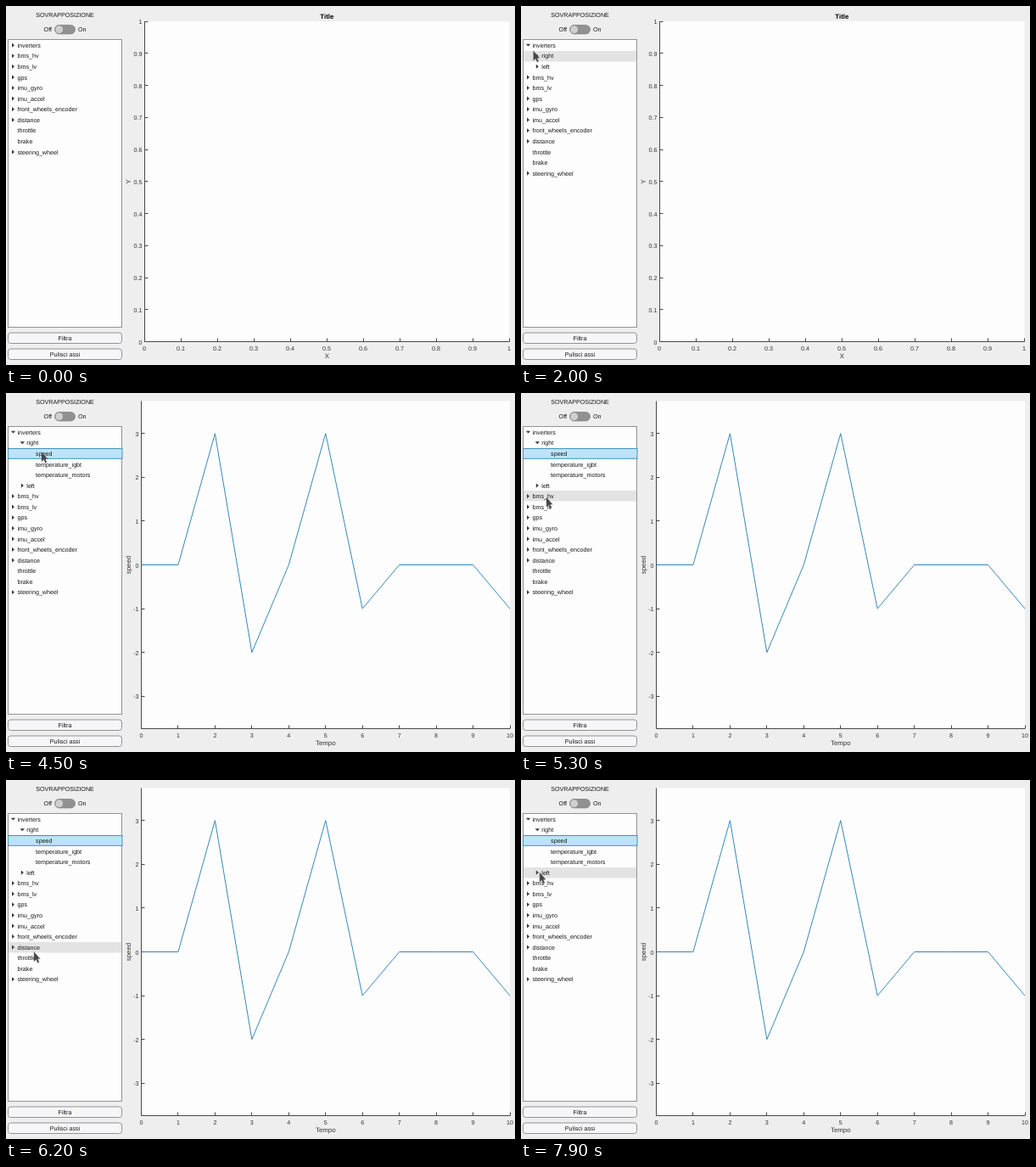
Write an HTML page that moves like this. It is 600 by 423 pixels and loops after 8000 ms.

```html
<!DOCTYPE html>
<html lang="it">
<head>
<meta charset="utf-8">
<title>Telemetria</title>
<style>
  html, body { margin: 0; width: 100%; height: 100%; overflow: hidden; background: #efeeef; }
  svg { display: block; width: 600px; height: 423px; }
  text { font: 7.15px "Liberation Sans", Arial, sans-serif; fill: #161616; text-rendering: geometricPrecision; }
  .tick { fill: #333; }
  .label { font-size: 7.8px; fill: #333; }
  .title { font-size: 7.8px; font-weight: bold; fill: #000; }
  .axis { fill: none; stroke: #484848; stroke-width: 1; }
  .box { fill: #f6f5f7; stroke: #949394; }
  .icon { fill: none; stroke: #858485; stroke-width: .9; stroke-linejoin: round; stroke-linecap: round; }
</style>
</head>
<body>
<svg id="stage" viewBox="0 0 600 423"></svg>
<script>
const LOOP = 8000, STEP = 100;
const ROW_TOP = 40, ROW_H = 12.57;
const stage = document.getElementById('stage');

function add(parent, tag, attrs = {}, content) {
  const el = document.createElementNS('http://www.w3.org/2000/svg', tag);
  for (const k in attrs) el.setAttribute(k, attrs[k]);
  if (content !== undefined) el.textContent = content;
  parent.append(el);
  return el;
}
const group = (parent = stage) => add(parent, 'g');
const rect = (p, x, y, width, height, more) => add(p, 'rect', { x, y, width, height, ...more });
const path = (p, d, more) => add(p, 'path', { d, ...more });
// y is the vertical middle of the capitals
const text = (p, s, x, y, anchor = 'start', cls = '', more = {}) =>
  add(p, 'text', { x, y: y + 2.6, 'text-anchor': anchor, class: cls, ...more }, s);
const show = (el, on) => el.setAttribute('visibility', on ? 'visible' : 'hidden');

// Side panel
text(stage, 'SOVRAPPOSIZIONE', 69.5, 10.8, 'middle');
text(stage, 'Off', 54, 27.6, 'end');
text(stage, 'On', 85, 27.6);
rect(stage, 57.5, 22.5, 24, 10.4, { rx: 5.2, fill: '#929192', stroke: '#858485', 'stroke-width': .8 });
add(stage, 'circle', { cx: 62.7, cy: 27.7, r: 4.9, fill: '#d0cfd0', stroke: '#858485', 'stroke-width': .8 });
rect(stage, 2.5, 39.5, 134, 339, { fill: '#fefdfe', stroke: '#949394' });
[['Filtra', 385], ['Pulisci assi', 404]].forEach(([s, y]) => {
  rect(stage, 2.5, y, 134, 12.5, { rx: 3, class: 'box' });
  text(stage, s, 69.5, y + 6.2, 'middle');
});

const rowY = i => Math.round(ROW_TOP + i * ROW_H);
const hover = rect(stage, 3, 0, 133, 12.5, { fill: '#e4e3e4' });
const picked = rect(stage, 2.5, rowY(2) + .5, 134.5, 11.8, { fill: '#bde3f9', stroke: '#3f95b8' });

// Tree in its three states; + closed, - open, space for a leaf
const rest = ['+bms_hv', '+bms_lv', '+gps', '+imu_gyro', '+imu_accel', '+front_wheels_encoder',
  '+distance', ' throttle', ' brake', '+steering_wheel'];
const trees = [
  ['+inverters'],
  ['-inverters', '>+right', '>+left'],
  ['-inverters', '>-right', '>> speed', '>> temperature_igbt', '>> temperature_motors', '>+left']
].map(head => {
  const g = group();
  head.concat(rest).forEach((item, i) => {
    const depth = item.lastIndexOf('>') + 1;
    const mark = item[depth], x = 10.8 * depth, y = 46.2 + i * ROW_H;
    if (mark === '+') path(g, `M${x + 7} ${y - 2.6}l3 2.6l-3 2.6z`, { fill: '#3a3a3a' });
    if (mark === '-') path(g, `M${x + 5.8} ${y - 1.4}h5.4l-2.7 2.8z`, { fill: '#3a3a3a' });
    text(g, item.slice(depth + 1), x + 13.5, y);
  });
  return g;
});

// Axes: ticks are [position, caption]
function axes({ left, top, right, xs, ys, xName, yName, midX, midY, nameX }) {
  const g = group(), bottom = 395.5;
  rect(g, left, top, right - left, bottom - top, { fill: '#fefdfe' });
  let d = `M${left} ${top}V${bottom}H${right}`;
  xs.forEach(([x, s]) => {
    d += `M${Math.floor(x) + .5} ${bottom}v-4`;
    text(g, s, x, 403.2, 'middle', 'tick');
  });
  ys.forEach(([y, s]) => {
    d += `M${left} ${Math.floor(y) + .5}h4`;
    text(g, s, left - 3, y + .4, 'end', 'tick');
  });
  path(g, d, { class: 'axis' });
  text(g, xName, midX, 412.6, 'middle', 'label');
  add(g, 'text', { transform: `translate(${nameX} ${midY}) rotate(-90)`, 'text-anchor': 'middle', class: 'label' }, yName);
  return g;
}
const range = (n, f) => Array.from({ length: n }, (_, i) => f(i));

const blank = axes({
  left: 163.5, top: 18, right: 593.5, midX: 378.3, midY: 207, nameX: 147.2, xName: 'X', yName: 'Y',
  xs: range(11, i => [163 + 43 * i, i / 10]),
  ys: range(11, i => [395.6 - 37.76 * i, i / 10])
});
text(blank, 'Title', 378.3, 12, 'middle', 'title');

const px = i => 159.5 + 43.45 * i, py = v => 202.5 - 51.6 * v;
const plot = axes({
  left: 159.5, top: 9.5, right: 594, midX: 376.8, midY: 202.5, nameX: 147.2, xName: 'Tempo', yName: 'speed',
  xs: range(11, i => [px(i), i]),
  ys: range(7, i => [py(i - 3), i - 3])
});
const speed = [0, 0, 3, -2, 0, 3, -1, 0, 0, 0, -1];
add(plot, 'polyline', {
  points: speed.map((v, i) => px(i) + ',' + py(v)).join(' '),
  fill: 'none', stroke: '#2b82b2', 'stroke-width': .95
});

// Axes toolbar: export, pan, zoom in, zoom out, home
const tools = group();
tools.setAttribute('class', 'icon');
path(tools, 'M536 12.5v4.5h7.5M538 14.5q1-4 4.5-4v-1.8l2.5 2.8l-2.5 2.6v-1.8q-3 0-4.5 2.2M543.5 16.6h1.4');
path(tools, 'M549.5 17.5l-2.6-4q.6-1.2 2 .3v-4q.9-1 1.5 0v2.4v-3.6q.9-1 1.6 0v3.6v-3q.9-.9 1.6 0v3.4v-1.8q1-.8 1.5.2v3.5l-1.2 3z');
[563, 574.8].forEach((x, i) => {
  add(tools, 'circle', { cx: x - .6, cy: 12.3, r: 3.5 });
  path(tools, `M${x + 2} 15l2.6 2.6M${x - 2.2} 12.3h3.2` + (i ? '' : `M${x - .6} 10.7v3.2`));
});
path(tools, 'M582.8 13.2l4.5-4.4l4.5 4.4M584 12.4v5h2.2v-3.2h2.2v3.2h2.2v-5');

const pointer = path(stage, 'M0 0V11.2L2.5 9L4.4 13L6 12.2L4.3 8.3H7.2Z',
  { fill: '#464546', stroke: '#7a797a', 'stroke-width': .4 });

// Pointer tip: [time, x, y], a pause is two equal rows
const trail = [
  [300, 200, 64], [400, 130, 66], [500, 75, 62], [600, 38, 56], [700, 20, 51], [800, 20, 51],
  [900, 13, 48], [1200, 8, 45], [1800, 8, 45], [2100, 18, 57], [2600, 18, 57],
  [2900, 28, 67], [3200, 42, 69.5], [4700, 42, 69.5], [4900, 40, 78], [5100, 35, 102],
  [5300, 30, 123], [5600, 31, 159], [5700, 31, 159], [6100, 33, 195], [6200, 33, 202.5],
  [6500, 33, 203], [6700, 32, 188], [7000, 28, 144], [7200, 23, 119], [7400, 16, 109],
  [7500, 16, 109], [7600, 22, 109], [8000, 22, 109]
];
function tipAt(t) {
  const i = trail.findIndex(k => k[0] > t);
  const [t0, x0, y0] = trail[i - 1], [t1, x1, y1] = trail[i];
  const p = (t - t0) / (t1 - t0);
  return [x0 + (x1 - x0) * p, y0 + (y1 - y0) * p];
}
const clamp = v => Math.max(0, Math.min(1, v));

function render(time) {
  const t = Math.floor(time % LOOP / STEP) * STEP;
  const state = (t >= 1700) + (t >= 2500);
  trees.forEach((g, i) => show(g, i === state));
  show(blank, t < 3900);
  show(plot, t >= 3900);
  show(picked, t >= 3600);
  tools.setAttribute('opacity', t < 900 ? clamp((t - 200) / 300) : clamp((1200 - t) / 300));

  const moving = t >= 300;
  show(pointer, moving);
  let row = -1;
  if (moving) {
    const [x, y] = tipAt(t);
    pointer.setAttribute('transform', `translate(${x} ${y})`);
    if (x < 136 && (t < 700 || t >= 1000)) row = Math.floor((y - ROW_TOP) / ROW_H);
  }
  show(hover, row >= 0 && !(t >= 3600 && row === 2));
  if (row >= 0) hover.setAttribute('y', rowY(row));
}

const start = performance.now();
(function frame() {
  render(performance.now() - start);
  requestAnimationFrame(frame);
})();
</script>
</body>
</html>
```
